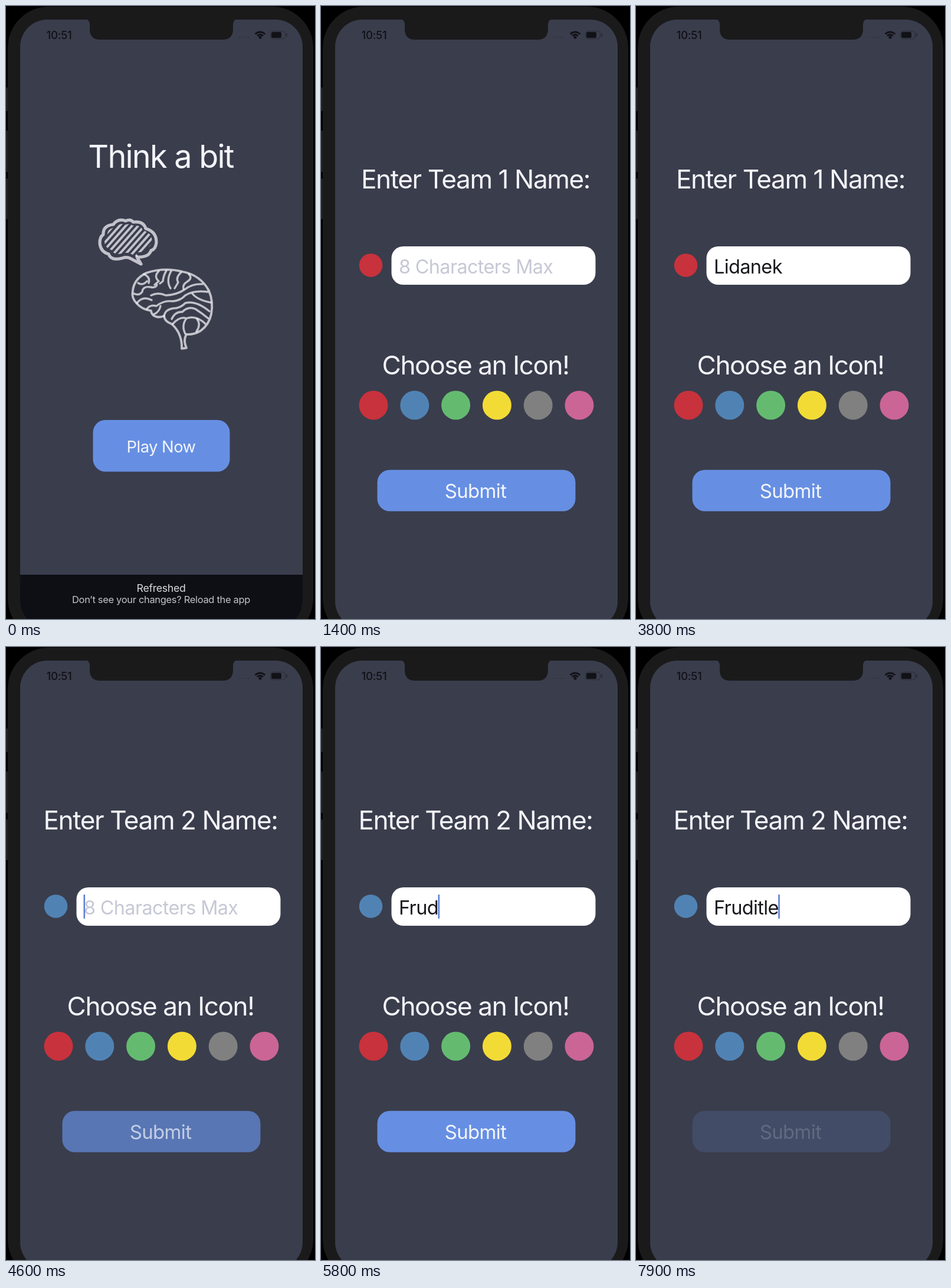
These frames come from a looping animation (524 px wide and 1038 px high, 8000 ms). An HTML page with a canvas:

```html
<!DOCTYPE html>
<html lang="en">
<head>
<meta charset="utf-8">
<title>Team quiz</title>
<style>
html, body { margin: 0; width: 100%; height: 100%; overflow: hidden; background: #000; }
canvas { display: block; width: 524px; height: 1038px; filter: blur(0.7px); }
</style>
</head>
<body>
<canvas id="stage" width="524" height="1038"></canvas>
<script>
const ctx = document.getElementById('stage').getContext('2d');
const LOOP = 8000;
const BODY = '#1a1a1b', SCREEN = '#3a3d4c', BLUE = '#668fe3', INK = '#f4f5fa', DARK = '#111217';
const ICONS = ['#c8323c', '#5083b4', '#64bb70', '#f3db36', '#808080', '#cb6596'];
const SWITCH_PAGE = 1100, SWITCH_TEAM = 4450;
const TEAMS = [
  { name: 'Lidanek', keys: [2700, 2900, 3000, 3100, 3300, 3400, 3500] },
  { name: 'Fruditle', keys: [5000, 5300, 5500, 5700, 5900, 6100, 6300, 6500] }
];
const CURSOR_ON = [[2300, 2500], [2700, 3700], [4200, 4900], [5000, 7000], [7400, 8000]];

const cloud = new Path2D('M212 428Q206 424 197 427Q178 432 174 420Q160 416 159 401Q159 391 165 387' +
  'Q164 372 182 370Q190 359 203 364Q211 360 216 366Q233 364 237 377Q255 382 255 400' +
  'Q254 412 246 414Q242 426 222 425L229 437Z');
const cloudInside = new Path2D();
cloudInside.addPath(cloud, new DOMMatrix([0.84, 0, 0, 0.77, 33.3, 90]));

const brain = new Path2D('M246 516Q231 514 222 504Q212 494 215 482Q217 462 238 452Q268 442 300 450' +
  'Q330 456 344 482Q352 500 348 522Q344 540 330 550Q318 557 306 556Q300 566 306 579L298 580' +
  'Q299 566 292 552Q286 542 280 538Q269 534 268 525Q257 529 250 524Q246 520 246 516');
const folds = [
  'M217 487Q226 491 231 484Q232 474 245 476Q254 478 256 472',
  'M224 469Q232 474 239 466M234 454Q245 459 242 469',
  'M259 449Q250 458 259 466L252 472M272 448Q267 456 266 466L261 470',
  'M280 449Q271 465 279 478M297 451Q287 460 292 468L286 478',
  'M310 454Q317 461 307 467Q299 472 301 479',
  'M222 503Q232 490 247 498M246 490Q258 484 271 490Q290 489 303 480Q316 470 333 471',
  'M239 513Q244 505 255 508Q268 498 282 500Q296 499 304 490Q318 481 342 484',
  'M251 522Q260 518 262 508M268 525Q270 514 283 512Q296 512 304 503Q322 498 345 517',
  'M281 530Q287 517 299 518Q309 508 321 513Q332 520 343 529',
  'M283 538Q295 525 306 529Q322 523 338 538M306 529Q297 541 304 555',
  'M324 530Q331 540 323 551M316 487Q325 498 347 502'
].map(d => new Path2D(d));

const clamp = v => Math.max(0, Math.min(1, v));
const ramp = (t, start, length) => clamp((t - start) / length);
const ease = u => u < 0.5 ? 2 * u * u : 1 - 2 * (1 - u) * (1 - u);

function box(x, y, w, h, radius, color) {
  ctx.fillStyle = color;
  ctx.beginPath();
  ctx.roundRect(x, y, w, h, radius);
  ctx.fill();
}

function disc(x, y, r, color) {
  ctx.fillStyle = color;
  ctx.beginPath();
  ctx.arc(x, y, r, 0, 2 * Math.PI);
  ctx.fill();
}

function label(text, x, y, size, color = INK, align = 'center', weight = 400) {
  const tracking = size > 40 ? -0.033 : -0.02;
  ctx.font = `${weight} ${size}px Inter, sans-serif`;
  ctx.letterSpacing = `${tracking * size}px`;
  ctx.textAlign = align;
  ctx.fillStyle = color;
  ctx.fillText(text, x, y);
  return ctx.measureText(text).width;
}

function drawPhone() {
  box(0, 0, 524, 1038, 0, '#000');
  for (const [y, h] of [[138, 40], [211, 70], [292, 69]]) box(-4, y, 8, h, 2, '#202021');
  box(3, 1, 518, 1072, 70, BODY);
}

function drawStatus() {
  ctx.fillStyle = BODY;
  ctx.fill(new Path2D('M134 22Q142 23 142 31V39Q142 57 160 57H367Q385 57 385 39V31Q385 23 393 22Z'));
  label('10:51', 90, 56, 18.8, DARK, 'center', 500);
  for (let x = 396; x < 414; x += 5) disc(x, 53, 1, '#2d2f3b');
  ctx.strokeStyle = DARK;
  ctx.lineWidth = 2.8;
  for (const r of [6.5, 11]) {
    ctx.beginPath();
    ctx.arc(431, 55, r, -Math.PI * 0.77, -Math.PI * 0.23);
    ctx.stroke();
  }
  disc(431, 53, 2.5, DARK);
  ctx.strokeStyle = '#292b35';
  ctx.lineWidth = 1;
  ctx.beginPath();
  ctx.roundRect(448.5, 42.5, 25, 13, 4);
  ctx.stroke();
  box(450, 44, 17, 10, 2.5, DARK);
  box(475, 46, 2, 6, 1, '#292b35');
}

function drawArt(alpha) {
  ctx.save();
  ctx.globalAlpha = alpha;
  ctx.strokeStyle = INK;
  ctx.lineCap = ctx.lineJoin = 'round';
  ctx.lineWidth = 5.2;
  ctx.stroke(cloud);
  ctx.lineWidth = 3.8;
  ctx.stroke(brain);
  ctx.lineWidth = 3.4;
  folds.forEach(fold => ctx.stroke(fold));
  ctx.clip(cloudInside);
  ctx.lineWidth = 4;
  ctx.beginPath();
  for (let x = 110; x < 260; x += 10.5) {
    ctx.moveTo(x, 430);
    ctx.lineTo(x + 62, 360);
  }
  ctx.stroke();
  ctx.restore();
}

function drawHome(t) {
  label('Think a bit', 262.5, 274, 54);
  drawArt(0.73 + 0.27 * ramp(t, 0, 600));
  const pressed = t >= 800;
  box(pressed ? 148.5 : 147.5, 701, 232, 87.5, 21, pressed ? '#2466cc' : BLUE);
  label('Play Now', 263, 756, 27.4, pressed ? '#7f9fe0' : INK);

  const drop = 191 * ease(ramp(t, 250, 150));
  if (drop < 75) {
    box(24, 963 + drop, 479, 100, 0, '#0e0f14');
    label('Refreshed', 263, 992 + drop, 17.8, '#d8d9de');
    label('Don’t see your changes? Reload the app', 263, 1011 + drop, 16.5, '#c2c3c9');
  }
}

function submitAlpha(t) {
  if (t >= 7700) return 1 - 0.82 * ease(ramp(t, 7700, 180));
  const down = ease(ramp(t, 4100, 150));
  const up = ease(ramp(t, 4460, 250));
  return 1 - 0.8 * (down - up);
}

function drawSetup(t) {
  const index = t < SWITCH_TEAM ? 0 : 1;
  const team = TEAMS[index];
  const typed = team.name.slice(0, team.keys.filter(key => t >= key).length);

  label(`Enter Team ${index + 1} Name:`, 262, 309, 44.2);
  disc(84.5, 439, 19.8, ICONS[index]);
  box(119.5, 407, 346, 65, 20, '#fff');
  const width = typed
    ? label(typed, 132, 452.5, 32.5, '#17181c', 'left')
    : (label('8 Characters Max', 132, 452.5, 32.4, '#c6c8d5', 'left'), 0);
  if (CURSOR_ON.some(([on, off]) => t >= on && t < off)) {
    box(131.5 + width, 419, 2.6, 41, 1, '#5f7fd6');
  }

  label('Choose an Icon!', 262, 624, 44.2);
  ICONS.forEach((color, i) => disc(89 + 69.8 * i, 676, 24.5, color));

  ctx.globalAlpha = submitAlpha(t);
  box(95.5, 785.5, 336, 70, 21, BLUE);
  label('Submit', 262, 832.5, 33);
  ctx.globalAlpha = 1;
}

function draw(t) {
  drawPhone();
  ctx.save();
  ctx.beginPath();
  ctx.roundRect(24, 23, 479, 1031, 46);
  ctx.clip();
  ctx.fillStyle = SCREEN;
  ctx.fillRect(24, 23, 479, 1031);
  if (t < SWITCH_PAGE) drawHome(t);
  else drawSetup(t);
  ctx.restore();
  drawStatus();
}

function tick(now) {
  draw(now % LOOP);
  requestAnimationFrame(tick);
}
requestAnimationFrame(tick);
</script>
</body>
</html>
```
